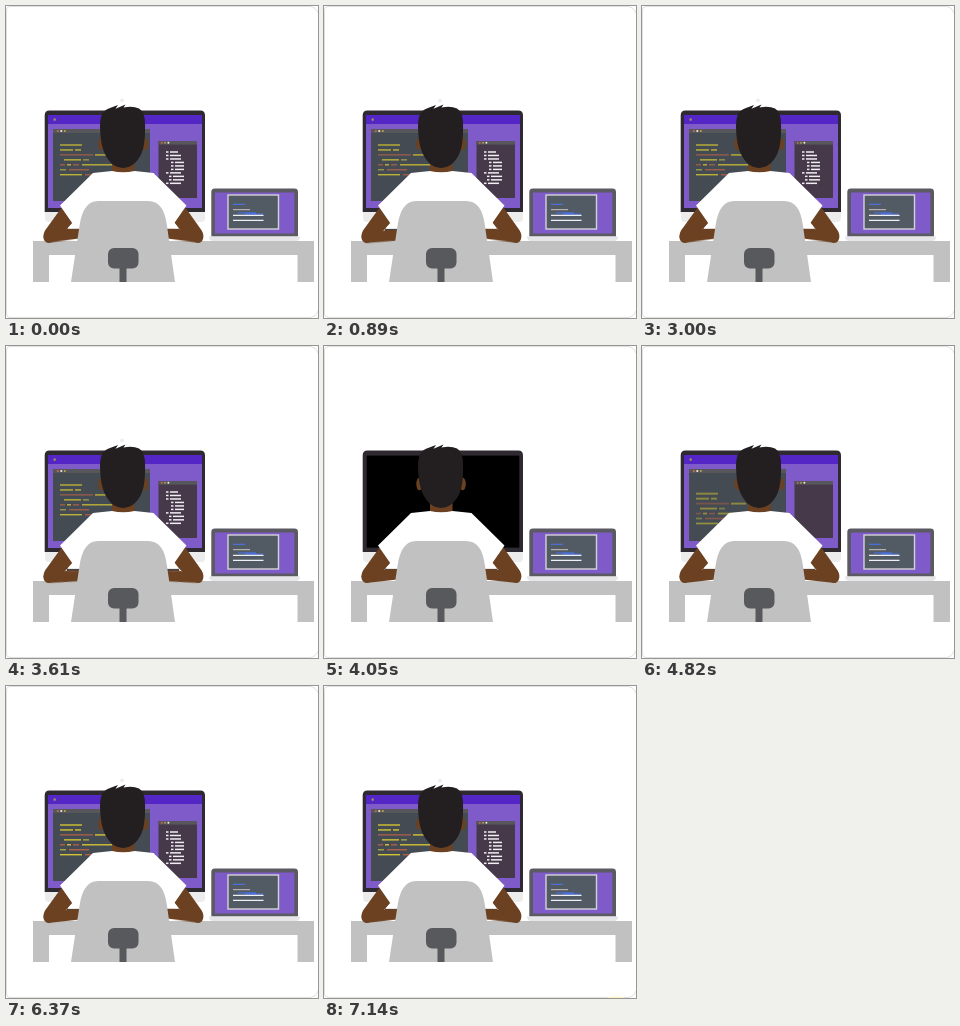
An HTML page that plays this animation: 312 by 312 pixels, repeating every 7.22 s.

```html
<!DOCTYPE html>
<html lang="en">
<head>
<meta charset="utf-8">
<title>Developer at a desk</title>
<style>
html, body { margin: 0; width: 100%; height: 100%; overflow: hidden; background: #fff; }
svg { display: block; width: 100vw; height: 100vh; }
.loop { animation: 7.22s linear infinite; }

#picture { animation-name: power; }
#editor { animation-name: pop; --over: 1.1; transform-origin: 95.5px 195px; }
#tree { animation-name: pop; --over: 1.18; transform-origin: 171.7px 192px; }
#code { animation-name: rise; }
#camera { animation-name: camera; }
#glow { animation-name: glow; }
#typing, #resting { animation-name: work; animation-timing-function: step-end; }
#typing { --busy: 1; --idle: 0; }
#resting { --busy: 0; --idle: 1; }

.forearm { animation: tap ease-in-out infinite; }
.left { animation-duration: .38s; transform-origin: 41px 232px; --up: -2deg; --down: 3deg; }
.right { animation-duration: .4247s; transform-origin: 194px 232px; --up: 2deg; --down: -3deg; }
#resting .forearm { animation: none; }

@keyframes power {
  0%, 55.1% { opacity: 1; }
  55.11%, 57% { opacity: 0; }
  57.01%, 100% { opacity: 1; }
}
@keyframes pop {
  0%, 55.1% { transform: scale(1); }
  55.11%, 57.1% { transform: scale(0); animation-timing-function: ease-out; }
  61% { transform: scale(var(--over)); animation-timing-function: ease-in-out; }
  63.5%, 100% { transform: scale(1); }
}
@keyframes rise {
  0%, 55.1% { transform: none; opacity: .85; }
  55.11%, 62% { transform: translateY(20px); opacity: 0; }
  66.7% { transform: translateY(9px); opacity: .7; animation-timing-function: ease-out; }
  70%, 100% { transform: none; opacity: 1; }
}
@keyframes camera {
  0%, 55.1% { opacity: 1; }
  55.11%, 80.3% { opacity: 0; }
  81.5%, 100% { opacity: 1; }
}
@keyframes glow {
  0%, 98.7% { opacity: 0; }
  98.8%, 100% { opacity: 1; }
}
@keyframes work {
  0%, 4.3%, 68.5%, 100% { opacity: var(--busy); }
  1.8%, 55.1% { opacity: var(--idle); }
}
@keyframes tap {
  0%, 100% { transform: rotate(var(--up)); }
  50% { transform: rotate(var(--down)); }
}
</style>
</head>
<body>
<svg viewBox="0 0 312 312">
  <defs>
    <clipPath id="glass"><rect x="42.7" y="109.6" width="152.6" height="92"/></clipPath>
  </defs>

  <path d="M312.5 8Q310 1 304 .5H4Q.5 .5 .5 4V308Q.5 311.5 4 311.5H304Q310 311 312.5 304" fill="#fff" stroke="#dfdfdf"/>
  <ellipse id="glow" class="loop" cx="292" cy="312" rx="8" ry="1.6" fill="#fff3c4"/>

  <!-- monitor -->
  <circle id="camera" class="loop" cx="116" cy="94.5" r="2" fill="#eee"/>
  <path d="M39 204H199V212Q199 216 195 216H43Q39 216 39 212Z" fill="#ececec"/>
  <path d="M38.7 206V109.5Q38.7 104.6 43.5 104.6H194.3Q199 104.6 199 109.5V206Z" fill="#2f2a31"/>
  <rect x="42.7" y="109.6" width="152.6" height="92"/>
  <g clip-path="url(#glass)">
    <g id="picture" class="loop">
      <rect x="42" y="109" width="154" height="93" fill="#7e5bc9"/>
      <rect x="42" y="109" width="154" height="9" fill="#5426c6"/>
      <circle cx="48.7" cy="113.6" r="1.3" fill="#a58a5c"/>
      <g id="editor" class="loop">
        <rect x="47" y="123" width="97" height="72" fill="#454b52"/>
        <rect x="47" y="123" width="97" height="4" fill="#57565b"/>
        <circle cx="51.8" cy="125" r="1" fill="#d9694f"/>
        <circle cx="55.3" cy="125" r="1.1" fill="#f1ecd8"/>
        <circle cx="58.8" cy="125" r="1" fill="#c4ac46"/>
      </g>
      <g id="code" class="loop" stroke-width="1.4"></g>
      <g id="tree" class="loop">
        <rect x="152.5" y="135" width="38.5" height="57" fill="#46394a"/>
        <rect x="152.5" y="135" width="38.5" height="3.6" fill="#57565b"/>
        <circle cx="155.8" cy="136.8" r=".9" fill="#d9694f"/>
        <circle cx="159" cy="136.8" r=".9" fill="#c4ac46"/>
        <circle cx="162.4" cy="136.8" r="1" fill="#f1ecd8"/>
      </g>
      <g id="files" stroke="#f2eff4" stroke-width="1.5"></g>
    </g>
  </g>

  <!-- laptop -->
  <path d="M205.3 230.5V186Q205.3 182.6 209 182.6H288.3Q292 182.6 292 186V230.5Z" fill="#5b5a62"/>
  <rect x="209" y="186.5" width="79.3" height="41" fill="#7e5bc9"/>
  <rect x="222" y="189" width="50.5" height="34" fill="#525b63" stroke="#d3d2d8" stroke-width="1.4"/>
  <g stroke-width="1.2">
    <path d="M227 198.3H239M232 206.8H250M239 208.2H257" stroke="#4b6fd6"/>
    <path d="M227 203.6H244" stroke="#b5b0ae"/>
    <path d="M227 209.4H257.5M227 214.3H257.5" stroke="#eef0f5"/>
  </g>
  <path d="M203 230.5H294V232Q293 235 290 235H207Q204 235 203 232Z" fill="#e6e5e7"/>

  <path d="M27 235H308V276H291.5V249H43V276H27Z" fill="#c1c1c1"/>

  <!-- arms -->
  <path d="M61 222.5H78V225H61ZM156 222.5H173V225H156Z" fill="#4a4344"/>
  <g id="typing" class="loop">
    <g id="forearms" fill="#6b4122">
      <path class="forearm left" d="M39 229L61 223.5 78 222.8V233L42 237Q38 236 39 229Z"/>
      <path class="forearm right" d="M196 229L173 223.5 156 222.8V233L193 237Q197 236 196 229Z"/>
    </g>
  </g>
  <g id="resting" class="loop"></g>
  <g fill="#6b4122">
    <path d="M56 201L39 224.5Q36.5 229 37.7 233T44 236.8L50 234 61 223 67 216Z"/>
    <path d="M179 201L195.7 224.5Q198.2 229 197 233T191 236.8L185 234 173.5 223 168 216Z"/>
  </g>

  <!-- body and head -->
  <path d="M106 148H128.5V170H106Z" fill="#6b4122"/>
  <path d="M106 165Q117 167.5 128.5 165L147.5 167 180.5 199.5 168 217.5 173 222.7H61.5L66.5 217.5 54 199.5 87 167Z" fill="#fff"/>
  <g fill="#6b4122">
    <ellipse cx="95.3" cy="138" rx="3" ry="6.3"/>
    <ellipse cx="138.8" cy="138" rx="3" ry="6.3"/>
  </g>
  <path d="M94 121C94 109 97 104 104 102L112 99 109.5 102.8 119.5 98.4 117.5 101.4Q127 99.5 133 102.5 139 106 139 118C139.5 139 137 149 129 157C121 163.5 113 163.5 105 157C97 148 94.5 138 94 121Z" fill="#231f20"/>

  <!-- chair -->
  <path d="M65 276L73.5 220C76 203 82 195 92 195H142C153 195 159 203 161 220L169 276Z" fill="#c1c1c1"/>
  <rect x="113.5" y="258" width="7" height="18" fill="#58595c"/>
  <rect x="102" y="242" width="30.5" height="20.5" rx="6" fill="#58595c"/>
</svg>
<script>
const $ = id => document.getElementById(id);
const LOOP = 7220, OFF = 3980;

function dash(parent, x1, x2, y, color) {
  const path = document.createElementNS("http://www.w3.org/2000/svg", "path");
  path.setAttribute("d", `M${x1} ${y}H${x2}`);
  if (color) path.setAttribute("stroke", color);
  parent.append(path);
  return path;
}

const Y = "#d3c433", R = "#b0604a", G = "#a9a545";
const code = [
  [[54, 76, Y]],
  [[54, 67, Y], [69, 75, Y]],
  [[54, 87, R], [89, 104, Y]],
  [[58, 75, Y], [77, 83, G]],
  [[54, 59, R], [61, 65, Y], [67, 73, R], [76, 107, Y]],
  [[54, 60, G], [63, 83, R]],
  [[54, 76, Y], [79, 89, R]]
];
code.forEach((row, i) =>
  row.forEach(([a, b, color]) => dash($("code"), a, b, 139 + 4.95 * i, color)));

// Each file row appears in turn after the screen restarts.
const indents = [160, 160, 160, 165, 165, 165, 160, 163, 163, 160];
indents.forEach((x, i) => {
  const y = 146 + 3.48 * i, on = (4960 + 50 * i) / LOOP, off = OFF / LOOP;
  const end = i ? Math.min(x + 15, 178) : 172;
  for (const [a, b] of [[x, x + 2.5], [x + 4, end]])
    dash($("files"), a, b, y).animate([
      { opacity: 1, offset: 0 }, { opacity: 1, offset: off },
      { opacity: 0, offset: off }, { opacity: 0, offset: on },
      { opacity: 1, offset: on }, { opacity: 1, offset: 1 }
    ], { duration: LOOP, iterations: Infinity });
});

const still = $("forearms").cloneNode(true);
still.removeAttribute("id");
$("resting").append(still);
</script>
</body>
</html>
```
